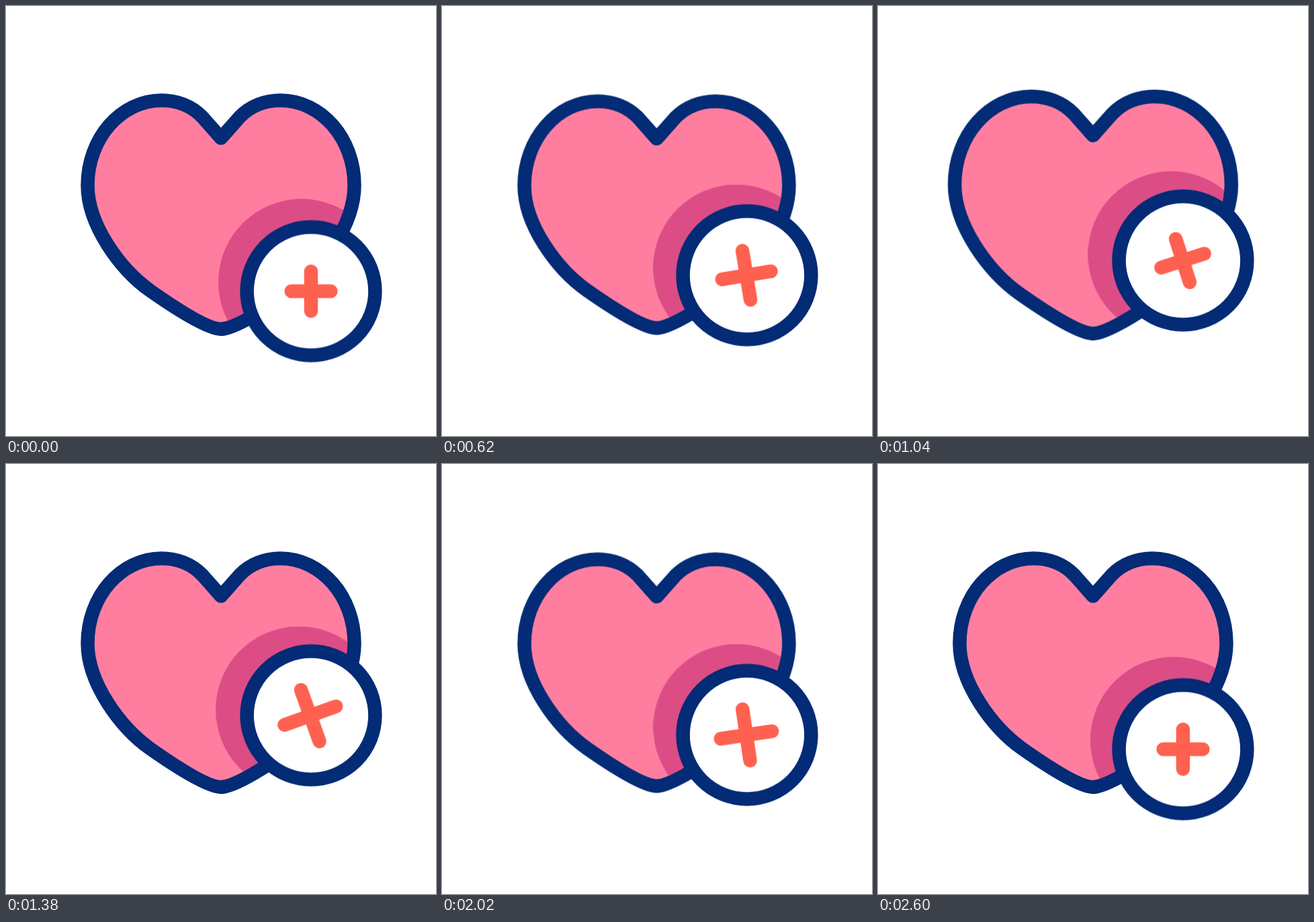
An HTML page for the animation above (2820 ms loop, 640 by 640 pixels).

```html
<!DOCTYPE html>
<html lang="en">
<head>
<meta charset="utf-8">
<title>Add to favourites</title>
<style>
  html, body { margin: 0; width: 100%; height: 100%; overflow: hidden; background: #fff; }
  svg { display: block; width: 640px; height: 640px; }

  .line {
    fill: none; stroke: #032b76; stroke-width: 20.5;
    stroke-linecap: round; stroke-linejoin: round;
  }
  .plus { stroke: #ff6150; }
  #heart, .plus { vector-effect: non-scaling-stroke; }

  .beat, .lift, .shade, .tilt, .pulse {
    animation: 2820ms cubic-bezier(.3333, 0, .6667, 1) infinite;
  }
  .beat { animation-name: beat; transform-origin: 320px 299.5px; }
  .lift { animation-name: lift; }
  .shade { animation-name: shade; }
  .tilt { animation-name: tilt; transform-origin: 0 0; }
  .pulse { animation-name: pulse; transform-origin: 0 0; }

  /* two heartbeats: shrink, swell, settle, with a short rest between */
  @keyframes beat {
    0%, 42.553%, 49.645%, 92.199%, 100% { transform: translate(0px) scale(1); }
    14.184%, 63.83% { transform: translate(-1.1px) scale(.8346); }
    28.369%, 78.014% { transform: translate(0px) scale(1.107); }
  }
  @keyframes lift {
    0%, 92.199%, 100% { transform: translateY(0px); }
    46.099% { transform: translateY(-51px); }
  }
  @keyframes shade {
    0%, 92.199%, 100% { transform: translate(0px, 0px); }
    46.099% { transform: translate(-4px, -46px); }
  }
  @keyframes tilt {
    0%, 92.199%, 100% { transform: rotate(0deg); }
    46.099% { transform: rotate(-20deg); }
  }
  @keyframes pulse {
    0%, 30.733%, 61.466%, 92.199%, 100% { transform: translate(0px) scale(1); }
    15.366%, 46.099%, 76.832% { transform: translate(-1.4px) scale(1.427); }
  }
</style>
</head>
<body>
<svg viewBox="0 0 640 640">
  <defs>
    <path id="heart" d="M320 196.6 L292 165 C276 148.5 254 140.5 231.5 140.5
      C170.8 140.5 121.5 197.2 121.5 267 C121.5 326 170 392 215 424
      C240 441.5 297 480.8 320 480.8 C343 480.8 400 441.5 425 424
      C470 392 518.5 326 518.5 267 C518.5 197.2 469.2 140.5 408.5 140.5
      C386 140.5 364 148.5 348 165 Z"/>
    <clipPath id="inside"><use href="#heart" class="beat"/></clipPath>
  </defs>

  <use href="#heart" class="beat" fill="#ff7ea0"/>
  <g clip-path="url(#inside)">
    <circle class="shade" cx="440" cy="411" r="124" fill="#dc4d86"/>
  </g>
  <use href="#heart" class="beat line"/>

  <g transform="translate(454 424.5)">
    <g class="lift">
      <circle class="line" r="95.4" style="fill: #fff"/>
      <g class="tilt">
        <g class="pulse">
          <path class="line plus" d="M-29.4 0H29.4M0 -29.4V29.4"/>
        </g>
      </g>
    </g>
  </g>
</svg>
</body>
</html>
```
